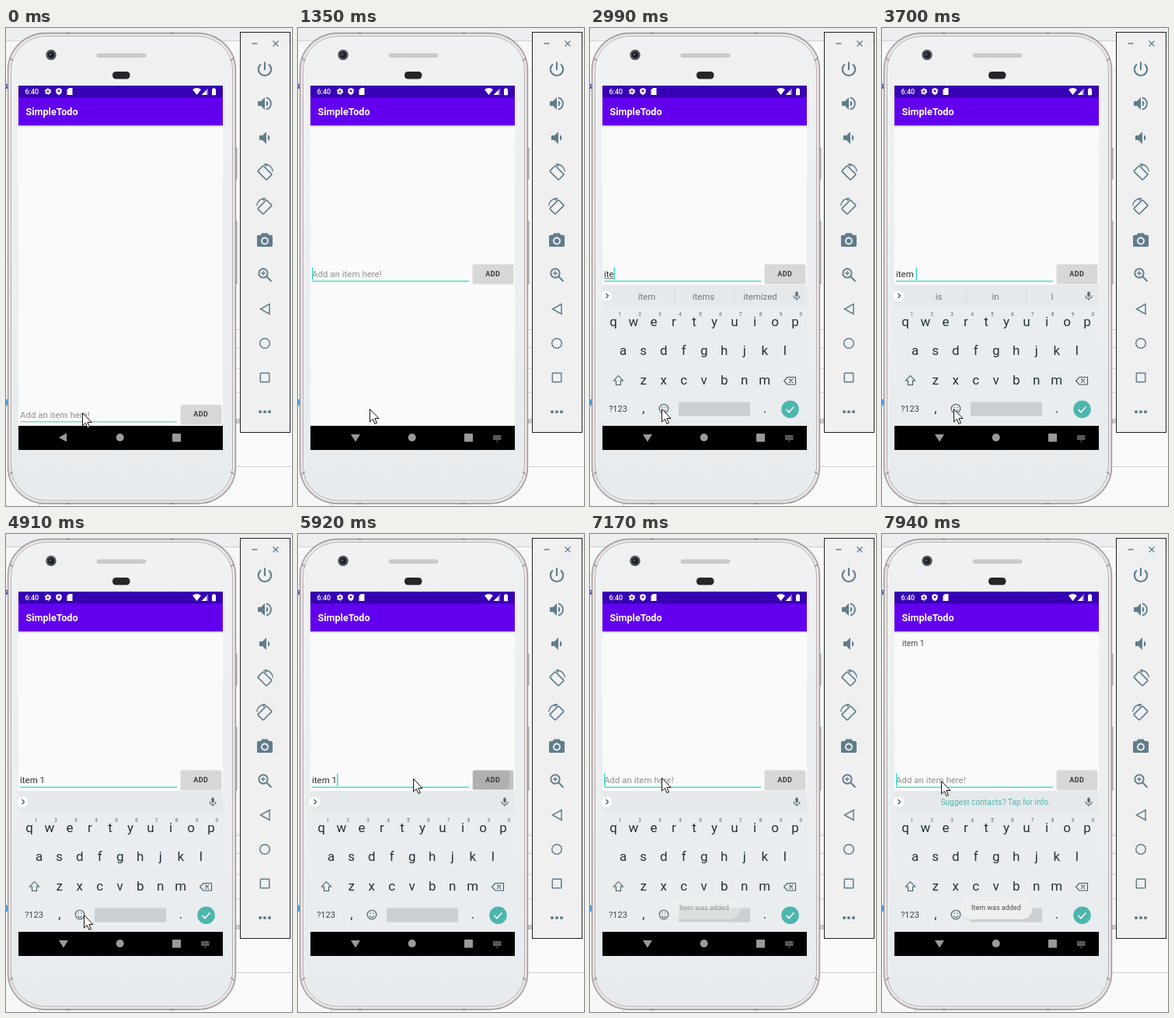
Recreate the animation shown at these times as an HTML page. Size 368 by 614 pixels, loop 8 s.

```html
<!DOCTYPE html>
<html lang="en">
<head>
<meta charset="utf-8">
<title>Todo app demo</title>
<style>
html, body { margin: 0; width: 100%; height: 100%; overflow: hidden; background: #f4f5f7; }
svg { display: block; width: 368px; height: 614px; font-family: Roboto, sans-serif; }
.line { fill: none; stroke: #607d8b; }
.solid { fill: #607d8b; }
.thin { fill: none; stroke: #455a64; }
.mid { text-anchor: middle; }
.key { font-size: 17px; fill: #263238; }
.num { font-size: 6.6px; fill: #59666d; }
.hintText { font-size: 11.5px; fill: #939393; }
.word { font-size: 11.4px; fill: #68777f; }
</style>
</head>
<body>
<svg viewBox="0 0 368 614">
  <defs>
    <linearGradient id="shell" x2="0" y2="1">
      <stop offset="0" stop-color="#f0f1f2"/><stop offset=".5" stop-color="#eceef0"/><stop offset="1" stop-color="#e8ebed"/>
    </linearGradient>
    <linearGradient id="shade" x2="0" y2="1">
      <stop offset="0" stop-color="#cfcfd2"/><stop offset="1" stop-color="#fafafa"/>
    </linearGradient>
    <clipPath id="btnClip"><rect x="225" y="303.5" width="52" height="24.5" rx="1.5"/></clipPath>
  </defs>

  <!-- desktop behind -->
  <rect width="368" height="614" fill="#f7f7f8"/>
  <rect width="368" height="16" fill="#eceef0"/>
  <path d="M0 16.5H368M0 297.5H3M290 387.5H302M290 410.5H302M290 437.5H302M290 468.5H302M43 611.5H368" stroke="#cfd0d2"/>
  <rect x="290" y="520" width="78" height="43" fill="#fafafa"/>
  <rect x="44" y="564" width="324" height="50" fill="#f9f9fa"/>
  <path d="M290 563.5H368" stroke="#cfd0d2"/>
  <path d="M43.5 608V614" stroke="#bbb"/>
  <rect y="477" width="2" height="8" fill="#4b9be0"/>
  <text x="-2.5" y="78" font-size="10" font-weight="700" fill="#1a1a80">s</text>
  <text x="293" y="508" font-size="10" fill="#888">ar</text>

  <!-- phone -->
  <path d="M295 154h2v40h-2zM295 248h2v81h-2z" fill="#d0cccc" stroke="#8f898a" stroke-width=".8"/>
  <rect x="2.5" y="6.5" width="293" height="604.5" rx="49" ry="47" fill="#d8d4d5" stroke="#a0989a" stroke-width="1.3"/>
  <rect x="4.5" y="8.5" width="289" height="600.5" rx="47" ry="45" fill="#f1efef"/>
  <rect x="6.5" y="10.5" width="285" height="596.5" rx="45" ry="43" fill="url(#shell)" stroke="#b3acae"/>
  <path d="M77 6.5h5M211 6.5h5M77 611h5M211 611h5M5 39l4 3M293 39l-4 3M5 573l4-3M293 573l-4-3" stroke="#8d888a" stroke-width="1.5"/>
  <circle cx="58" cy="34.5" r="6.7" fill="#505357"/>
  <circle cx="58" cy="34.5" r="4" fill="#191c22"/><circle cx="57" cy="34" r="1.5" fill="#526075"/>
  <rect x="117" y="33" width="63" height="4.5" rx="2.2" fill="#cdcdce" stroke="#b9b9ba" stroke-width=".7"/>
  <rect x="137" y="56" width="22.5" height="9.5" rx="4.5" fill="#25262a"/>

  <!-- app -->
  <rect x="16" y="74" width="263" height="468" fill="#fafafa"/>
  <rect x="16" y="125" width="263" height="3" fill="url(#shade)"/>
  <rect x="16" y="89" width="263" height="36.2" fill="#6200ee"/>
  <rect x="16" y="74" width="263" height="15.3" fill="#3700b3"/>
  <g fill="#fff">
    <text x="24.5" y="84.5" font-size="9" font-weight="500">6:40</text>
    <text x="25.5" y="112" font-size="12.6" font-weight="700">SimpleTodo</text>
    <circle cx="54" cy="81.5" r="2.3" fill="none" stroke="#fff" stroke-width="1.9"/>
    <circle cx="54" cy="81.5" r="3.6" fill="none" stroke="#fff" stroke-width="1.2" stroke-dasharray="1.9"/>
    <path d="M68 77l3.7 1.5v3q0 3-3.7 4.5q-3.7-1.5-3.7-4.5v-3z"/>
    <circle cx="68" cy="81" r="1.4" fill="#3700b3"/>
    <path d="M81 77h4.5v9h-7v-6.5z"/>
    <path d="M240 79q5.5-4 11 0l-5.5 7zM260 77.5v8.5h-8.5zM265 78.2h1.5v-1.2h2v1.2h1.5v8h-5z"/>
    <path d="M258 79.5v6.5h2v-8.5z" fill="#8c6fd6"/>
  </g>
  <text id="item" x="26" y="144" font-size="10.24" fill="#444">item 1</text>

  <g id="form">
    <text id="hint" class="hintText" x="18" y="320">Add an item here!</text>
    <text id="typed" x="18" y="320" font-size="11.5" fill="#333" style="white-space:pre"></text>
    <path id="compose" stroke="#555" stroke-width=".9"/>
    <rect id="rule" x="18" y="324.6" width="202" height="1.4" fill="#3fdccd"/>
    <rect id="caret" y="307.5" width="1.4" height="16" fill="#2fd9c8"/>
    <rect x="224.5" y="304" width="53" height="25.2" rx="2" fill="#c9c9c9" opacity=".65"/>
    <rect x="225" y="303.5" width="52" height="24.5" rx="1.5" fill="#d6d7d7"/>
    <g id="press" clip-path="url(#btnClip)">
      <rect x="225" y="303" width="52" height="26" fill="#000" opacity=".1"/>
      <circle cx="233" cy="314" r="39.5" fill="#000" opacity=".09"/>
    </g>
    <text class="mid" x="250.8" y="318.5" font-size="8.96" font-weight="700" letter-spacing=".4" fill="#3a3a3a">ADD</text>
  </g>

  <g id="board" stroke-width="1.1">
    <rect x="16" y="330" width="263" height="181" fill="#e9edef"/>
    <rect x="16" y="330" width="263" height="27.5" fill="#e5e9ec"/>
    <circle cx="21.5" cy="344" r="6.8" fill="#fff"/>
    <path class="thin" d="M20.5 341l3 3l-3 3" stroke-width="1.3"/>
    <g fill="#5d6a71">
      <rect x="264.3" y="338.5" width="3.4" height="7" rx="1.7"/>
      <path d="M262 343.5q0 4 4 4t4-4M266 347.5v2.5" fill="none" stroke="#5d6a71"/>
    </g>
    <g id="words"><path d="M108.5 337v15M185.5 337v15" stroke="#d0d5d8"/></g>
    <text id="suggest" class="mid" x="146" y="348" font-size="10.2" fill="#4db6ac">Suggest contacts? Tap for info.</text>
    <g id="keys"></g>
    <path class="thin" d="M36.500 446.500l6 6.500h-3v5.500h-6v-5.500h-3z"/>
    <path class="thin" d="M254 448.500h10.500v9.500h-10.500l-4.500-4.750zM256 450.700l5 5M261 450.700l-5 5"/>
    <text class="mid" x="36" y="493" font-size="11" fill="#37474f">?123</text>
    <circle class="thin" cx="95" cy="489" r="5.8"/>
    <path class="thin" d="M92 490.500q3 4 6 0M92.300 487.300h1.500M96.200 487.300h1.500"/>
    <rect x="114" y="480.5" width="92" height="18" rx="1.5" fill="#c9cfd2"/>
    <circle cx="257.5" cy="489.7" r="11.3" fill="#4db6ac"/>
    <path d="M252.500 490l3.500 3.500l6.500-7" fill="none" stroke="#fff" stroke-width="1.7"/>
  </g>

  <g id="toast">
    <rect x="100.5" y="467" width="93" height="29" rx="14" fill="#c5c9cb" opacity=".5"/>
    <rect x="100.5" y="466" width="93" height="29" rx="14" fill="#eeefef"/>
    <text x="115" y="483" font-size="9" fill="#4c4c4c">Item was added</text>
  </g>

  <rect x="16" y="511" width="263" height="31" fill="#000"/>
  <g fill="#9a9a9a">
    <path id="back"/>
    <circle cx="146.7" cy="526" r="5"/>
    <rect x="214" y="521" width="11" height="10.5" rx=".8"/>
    <g id="kbIcon" fill="#666">
      <rect x="251" y="523" width="10.5" height="6" rx=".7"/>
      <path d="M252 524.800h9M252 526.500h9" stroke="#111" stroke-width=".8" stroke-dasharray="1"/>
      <path d="M254.500 530h3.500l-1.750 1.700z"/>
    </g>
  </g>

  <!-- emulator toolbar -->
  <rect x="301.5" y="5.5" width="64" height="514" fill="#f0f0f0" stroke="#222"/>
  <g stroke-width="1.9">
    <path class="line" d="M316.500 20h7M343.500 16.500l7 7M350.500 16.500l-7 7" stroke-width="1.3"/>
    <path class="line" transform="translate(333 53)" d="M0-9.500V1M-5-6.500a8.200 8.200 0 1 0 10 0" stroke-width="2.1"/>
    <g transform="translate(333 97)">
      <path class="solid" d="M-9-3h4l5-5v16l-5-5h-4z"/>
      <path class="solid" d="M2-4q5 4 0 8z"/><path class="line" d="M2-7.500a7.700 7.700 0 0 1 0 15"/>
    </g>
    <path class="solid" transform="translate(333 141)" d="M-7-3h4l5-5v16l-5-5h-4zM4-4q5 4 0 8z"/>
    <g id="rot" transform="translate(333 185)">
      <rect class="line" x="-5" y="-8" width="10" height="16" rx="1" transform="translate(0 1) rotate(-45)" stroke-width="1.7"/>
      <path class="line" d="M0-10q9 .5 10.500 9.500" stroke-width="1.3"/>
      <path class="solid" d="M-2-10.600h5l-1 4z"/>
    </g>
    <use href="#rot" transform="translate(666 44) scale(-1 1)"/>
    <g transform="translate(333 272.5)">
      <path class="solid" d="M-3.500-9h7l2 2.500h3q1.500 0 1.500 1.500v12q0 1.500-1.500 1.500h-17q-1.500 0-1.500-1.500v-12q0-1.500 1.500-1.500h3z"/>
      <circle class="solid" cy="1" r="4" stroke="#f0f0f0"/>
    </g>
    <g class="line" transform="translate(331 315)"><circle r="5.7"/><path d="M4.500 4.500l6 6"/><path d="M-3 0h6M0-3v6" stroke-width="1.3"/></g>
    <g class="line" stroke-width="1.5">
      <path d="M339 354.500v13l-11.500-6.500z"/>
      <circle cx="333" cy="405" r="6.3"/>
      <rect x="327.3" y="443.3" width="11.5" height="11.5" rx=".7"/>
    </g>
  </g>
  <g class="solid"><circle cx="327" cy="493" r="2.1"/><circle cx="333" cy="493" r="2.1"/><circle cx="339" cy="493" r="2.1"/></g>

  <path id="mouse" d="M.5.500v16.500l3.800-3.600l2.700 6.100l2.500-1.100l-2.700-5.900h5.200z" fill="#fff" stroke="#111"/>
</svg>
<script>
const LOOP = 8000;
const $ = id => document.getElementById(id);
const show = (id, on) => { $(id).style.display = on ? '' : 'none'; };

function addText(parent, cls, x, y, text) {
  const el = document.createElementNS('http://www.w3.org/2000/svg', 'text');
  el.setAttribute('class', 'mid ' + cls);
  el.setAttribute('x', x);
  el.setAttribute('y', y);
  el.textContent = text;
  parent.append(el);
  return el;
}

const keyRow = (chars, x, y) =>
  [...chars].forEach((c, i) => addText($('keys'), 'key', x + i * 26, y, c));
keyRow('qwertyuiop', 30, 383);
keyRow('asdfghjkl', 42.7, 420);
keyRow('zxcvbnm', 68.7, 458);
keyRow(',', 69, 494);
keyRow('.', 225, 494);
[...'1234567890'].forEach((c, i) => addText($('keys'), 'num', 38.3 + i * 25.9, 370, c));
const slots = [73, 146, 219].map(x => addText($('words'), 'word', x, 348.5, ''));

// each step changes only the listed properties
const steps = [
  [0, { mouse: [98, 494], up: false, board: false, text: '', caret: false, compose: false, words: '', press: 0, toast: 0, item: false, suggest: false }],
  [250, { mouse: [95, 491] }],
  [370, { mouse: [92, 489] }],
  [490, { caret: true }],
  [770, { caret: false }],
  [1040, { up: true }],
  [1350, { caret: true }],
  [1880, { board: true, text: 'i', compose: true }],
  [2280, { caret: false }],
  [2430, { text: 'ite', caret: true }],
  [2990, { words: 'item items itemized' }],
  [3140, { text: 'item' }],
  [3550, { text: 'item ', compose: false }],
  [3700, { words: 'is in I' }],
  [4100, { caret: false }],
  [4350, { text: 'item 1', caret: true, words: '' }],
  [4910, { caret: false, mouse: [100, 489] }],
  [5040, { mouse: [140, 349] }],
  [5190, { mouse: [182, 321] }],
  [5340, { mouse: [230, 314] }],
  [5470, { mouse: [236, 313], caret: true }],
  [5780, { mouse: [232, 313] }],
  [5920, { mouse: [148, 314], press: 1 }],
  [6050, { mouse: [106, 315], press: .8 }],
  [6200, { mouse: [100, 315], press: .5, text: '' }],
  [6320, { mouse: [98, 314], press: .3 }],
  [6470, { mouse: [96, 313], press: .15 }],
  [6590, { press: 0, toast: .1 }],
  [6710, { toast: .25 }],
  [7020, { mouse: [94, 313] }],
  [7170, { mouse: [92, 313], toast: .5 }],
  [7290, { mouse: [85, 315], toast: .75, item: true }],
  [7410, { mouse: [78, 317], toast: .9, caret: false }],
  [7530, { mouse: [75, 318], toast: 1, suggest: true }],
  [7940, { mouse: [76, 317], caret: true }]
];

function draw(s) {
  $('mouse').setAttribute('transform', `translate(${s.mouse})`);
  $('form').setAttribute('transform', `translate(0 ${s.up ? 0 : 180.5})`);
  $('rule').setAttribute('fill', s.up ? '#3fdccd' : '#85d0c6');
  $('back').setAttribute('d', s.up ? 'M68 522h12l-6 9.500z' : 'M78 520.500v11l-10-5.500z');
  show('kbIcon', s.up);
  show('board', s.board);
  show('hint', !s.text);
  show('item', s.item);
  show('suggest', s.suggest);
  show('words', s.words);
  s.words.split(' ').forEach((w, i) => { slots[i].textContent = w; });
  $('typed').textContent = s.text;
  const end = 18 + (s.text ? $('typed').getComputedTextLength() : 0);
  $('caret').setAttribute('x', end);
  show('caret', s.caret);
  $('compose').setAttribute('d', `M18 321.700H${end}`);
  show('compose', s.compose);
  $('press').style.opacity = s.press;
  $('toast').style.opacity = s.toast;
}

let last = -1;
function tick() {
  const t = performance.now() % LOOP;
  const n = steps.filter(([at]) => at <= t).length;
  if (n !== last) {
    draw(Object.assign({}, ...steps.slice(0, n).map(step => step[1])));
    last = n;
  }
  requestAnimationFrame(tick);
}
tick();
</script>
</body>
</html>
```
